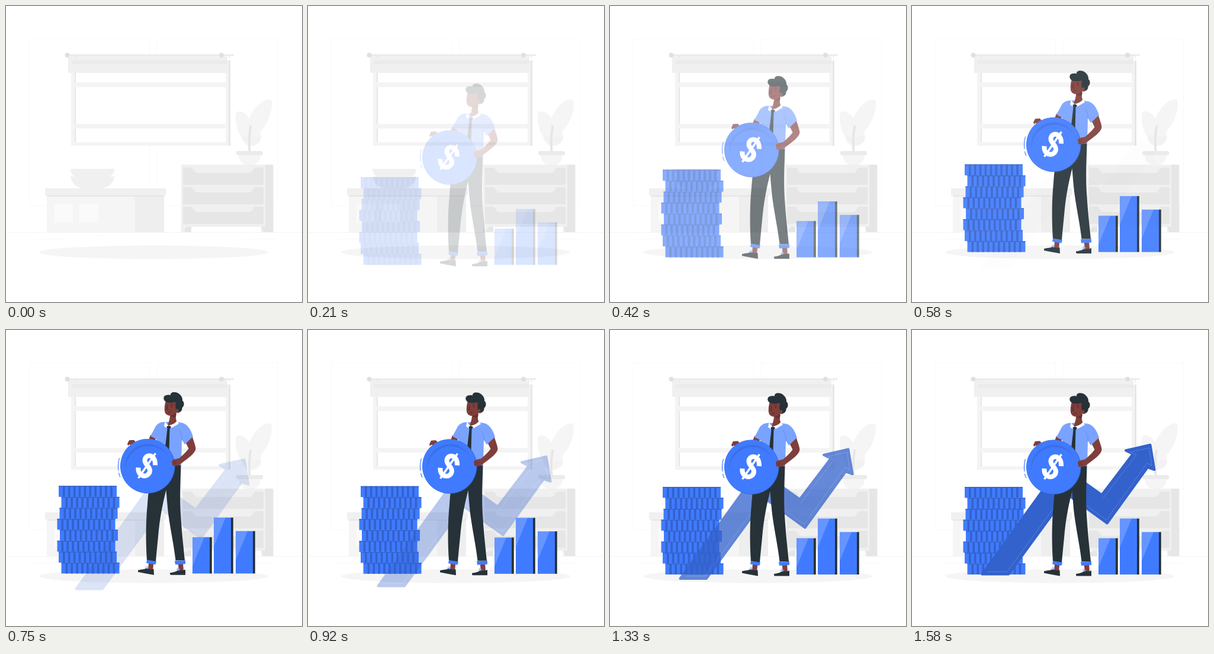
Write an HTML page that moves like this. It is 500 px wide and 500 px high and loops after 1620 ms.

```html
<!DOCTYPE html>
<html lang="en">
<head>
<meta charset="utf-8">
<title>Growth</title>
<style>
  html, body { margin: 0; width: 100%; height: 100%; overflow: hidden; background: #fff; }
  svg { display: block; width: 100vw; height: 100vh; }
  .rise, #arrow { opacity: 0; }
  .skin { fill: #7f3e3b; }
  .dark { fill: #263238; }
  .blue { fill: #407bff; }
  .shirt { fill: #79a3ff; }
  .g1 { fill: #fafafa; }
  .g2 { fill: #f5f5f5; }
  .g3 { fill: #f0f0f0; }
  .g4 { fill: #e6e6e6; }
  .g5 { fill: #e0e0e0; }
</style>
</head>
<body>
<svg viewBox="0 0 500 500" xmlns="http://www.w3.org/2000/svg">
  <defs>
    <g id="drawer"><path class="g4" d="M299 273H312Q315 273 317 277Q319 282 324 282H410Q415 282 417 277Q419 273 422 273H435V302H299Z"/></g>
  </defs>

  <g id="room">
    <g fill="none" stroke="#f9f9f9">
      <rect x="39" y="55" width="203.500" height="282.500" rx="2"/>
      <rect x="255" y="55" width="203.500" height="282.500" rx="2"/>
    </g>
    <path d="M0 382.500H500" stroke="#f2f2f2" stroke-width=".8"/>
    <path d="M47 394H97M153 388.500H167M403 394H456" stroke="#f5f5f5" stroke-width=".7"/>

    <!-- window and blind -->
    <path fill="#fff" d="M110 84H379V236H110Z"/>
    <path fill="#f4f4f4" fill-rule="evenodd" d="M110 92H379V236H110ZM118 98V129H371V98ZM118 137V199H371V137ZM118 207V230H371V207Z"/>
    <path class="g4" d="M376 92H379V236H376ZM116 98H118V129H116ZM116 137H118V199H116ZM116 207H118V230H116Z"/>
    <path class="g3" d="M105 84H374V113H105Z"/>
    <path fill="#ebebeb" d="M111 92H374V98H111Z"/>
    <path d="M103 82.700H385" stroke="#e0e0e0" stroke-width="1.500"/>
    <path d="M117 84V88M377.500 84V88" stroke="#e0e0e0"/>
    <circle class="g5" cx="103.500" cy="83" r="4"/>
    <circle class="g5" cx="364" cy="83" r="4"/>

    <!-- plant -->
    <g class="g2">
      <path d="M411 235C392 222 387 200 388 184C389 173 405 178 411 190C417 174 433 156 446 158C453 161 447 190 436 204C431 210 428 213 431 221C429 231 420 236 411 235Z"/>
      <path class="g3" opacity=".6" d="M411 237C402 234 396 226 399 218C406 223 420 222 430 219C433 228 425 237 411 237Z"/>
      <path d="M393 251H430C430 262 423 268 417 268H406C400 268 393 262 393 251Z"/>
    </g>
    <path d="M411.500 246C410 228 411 214 413.500 202" fill="none" stroke="#e6e6e6" stroke-width="4"/>
    <rect x="389" y="245" width="45" height="7" rx="2.500" fill="#ebebeb"/>

    <!-- dresser -->
    <path class="g3" d="M296 268H438V382H431V373H302V382H296Z"/>
    <path class="g4" d="M438 268H451.500V382H438ZM302 382V376Q303 373 306 373H313V382ZM431 373H438V382H435Z"/>
    <use href="#drawer"/><use href="#drawer" y="33"/><use href="#drawer" y="66"/>

    <!-- sideboard and bowls -->
    <path class="g2" d="M69 320H218V382H69Z"/>
    <path fill="#eee" d="M218 320H267V382H218Z"/>
    <path class="g1" d="M82 334H113V366H82ZM124 334H156V366H124Z"/>
    <path class="g3" d="M66 308H270V320H66Z"/>
    <path d="M69 321H267" stroke="#e2e2e2" stroke-width="1.500"/>
    <path class="g3" d="M109 275H183C183 281 180 286 175 288H183C182 299 172 308 160 308H132C120 308 110 299 109 288H117C112 286 109 281 109 275Z"/>

    <ellipse class="g2" cx="249.500" cy="416" rx="193.500" ry="11.500"/>
  </g>

  <g id="stack" class="rise"></g>

  <g id="arrow">
    <path d="M118.500 412.500L251 229L320.500 278.500L373 209.500L361 203.500L402.500 194L409.500 236L398 232L329.500 326.500L262 277.500L163 412.500Z" fill="#3362cc" stroke="#3362cc" stroke-width="4" stroke-linejoin="round"/>
    <path d="M127 408.500H160.500L261 271L328 321L397 225L405 229L400.500 199L368 206.500L379 211L322 285" fill="none" stroke="#fff" stroke-width=".6" opacity=".3"/>
  </g>

  <g id="bars" class="rise"></g>

  <g id="man" class="rise">
    <!-- feet -->
    <path class="skin" d="M241 394H249.500L248 408H240ZM290.500 394H299L300 409H292Z"/>
    <path class="dark" d="M223 407.500C229 406 235 406 239 403.500C242 407 246 406 249.500 405.500L250 415.500C240 414 231 412 223 410.500ZM277 412C283 411 288 410 292 406.500C295 409 299 407.500 303 406.500V415.500H278Q276.500 414 277 412Z"/>
    <path d="M235 403L240 405M237 401L241 403.500M288 406L293 408M289 404L294 406" stroke="#79a3ff" stroke-width="1.200"/>

    <!-- trousers -->
    <path class="dark" d="M249 229H295.500C295 255 293 285 295.500 320C297 345 300 370 302 391H286.500C284 368 278 340 275 318C273 304 272 290 270.500 272C266 290 261 312 258 340C256 362 254 380 253 394L238 391C236 360 236 325 239 296C240 280 243 252 249 229Z"/>
    <path class="blue" d="M238 390L254 392.500L252.500 398L237 395.500ZM285 391.500L303 391V397L286 398Z"/>

    <!-- body -->
    <path class="skin" d="M244 179L254 183L249 196H238Z"/>
    <path class="shirt" d="M268 157C259 157 254 161 251 168L244 181L254 186L253 230H296L297 187L302 195L316 182C313 172 307 160 297 158.500L288 157Z"/>
    <path d="M297 188C298 181 296 175 292 170" fill="none" stroke="#5b87e8" stroke-width=".8"/>
    <path class="skin" d="M277 141L288 143C286 150 287 155 290 158C286 163 279 165 273 165C272 161 278 155 277 141Z"/>
    <path fill="#fff" d="M269 155L267 164L271 167L275 164L280 167L292 160L289 155C285 160 280 162 275 163C271 161 270 158 269 155Z"/>
    <path class="dark" d="M271.500 164.500L275 163L279 165L276.500 169L275 225H266L272.500 169Z"/>

    <!-- head -->
    <path class="skin" d="M270 121C267.500 129 267 138 269 142C272 148 283 148 288 141.500C293 143.500 296 139 293 134L290 122Z"/>
    <path d="M278 146.500C282 146 285 144 288 141L287 148C284 150 281 149 278 146.500Z" fill="#000" opacity=".2"/>
    <path class="dark" d="M271 123.500C264 120 265 111 273 111.500C275 111 277 111 278 112C277 105 289 105 294 111C297 113.500 298.500 118 298 121C302 124 301 131 297.500 133C298 138 294 142 291 139.500C292.500 135 289 133 287.500 136.500C285.500 132 286.500 126 287 123C281 125 275 125 271 123.500Z"/>
    <path d="M271 128.500L273.500 128M278 127L282 128.500M273 131L271 136H274M273 141Q276 141.500 278 140" fill="none" stroke="#4a2220" stroke-width=".9"/>
    <path class="dark" d="M271.500 130.500h1.500v2h-1.500zM279 130h1.500v2h-1.500z"/>

    <!-- coin -->
    <path class="skin" d="M205 194L208 188L216 187.500L219 191L214 198L209 195L206 197Z"/>
    <circle cx="239.500" cy="231.700" r="46" fill="#3362cc"/>
    <circle class="blue" cx="238.700" cy="231.300" r="45.700"/>
    <path d="M202 238A38 38 0 0 1 274 216A39 39 0 0 0 202 238Z" fill="#3970e8"/>
    <path d="M191.500 218Q188.500 228 190 239M190.500 243Q191 247 193 250" fill="none" stroke="#407bff" stroke-width="1.200"/>
    <g fill="none" stroke="#fff">
      <path d="M252 230C253 211 236 210 234.500 221C233.500 229 244 232 243 240C241 252 222 251 223.500 234" stroke-width="8"/>
      <path d="M223.500 252L252.500 210" stroke-width="3.500"/>
    </g>

    <!-- right arm -->
    <path class="skin" d="M304 193L315 182.500C317 190 320 196 320.500 202C320 210 308 218 296 227C293 231 286 232 281 230.500L280 223C284 219 289 220 293 218C300 212 306 206 308.500 202Z"/>
    <path d="M281 225L288 224M282 228L288 227" stroke="#5f2c2a" stroke-width=".7"/>
  </g>
</svg>
<script>
  const $ = id => document.getElementById(id);
  const box = (x, y, w, h, fill) =>
    `<rect x="${x}" y="${y}" width="${w}" height="${h}" fill="${fill}"/>`;
  const BLUE = '#407bff', SHADE = '#3362cc', DARK = '#263238';

  // stacked coins with ribbed rims
  const lefts = [89, 93.5, 90.5, 86.5, 91, 86.5, 89, 93.5];
  $('stack').innerHTML = lefts.map((x, i) => {
    const y = 265 + i * 18.5;
    let s = box(x, y, 98, 18.5, BLUE) + box(x, y, 98, 1.5, SHADE);
    for (let k = 0; k < 10; k++) s += box(x + 7 + k * 8.9, y, 3.6, 18.5, SHADE);
    return s;
  }).join('');

  // bar chart
  const bars = [[315, 351.7], [351, 318.5], [388, 341.3]];
  $('bars').innerHTML = bars.map(([x, y]) =>
    box(x, y, 29, 413 - y, BLUE) + box(x + 29, y, 3.8, 413 - y, DARK) +
    `<path d="M${x} ${y}h20l-20 49z" fill="#fff" opacity=".2"/>`).join('');

  const LOOP = 1620, FPS = 24, LEAD = 0.02;
  const clamp = v => Math.min(1, Math.max(0, v));
  const curve = (a, b, s) => 3 * a * s * (1 - s) ** 2 + 3 * b * s * s * (1 - s) + s ** 3;

  // cubic-bezier(.36, -.01, .5, 1.38)
  function overshoot(x) {
    if (x <= 0 || x >= 1) return clamp(x);
    let lo = 0, hi = 1;
    for (let i = 0; i < 30; i++) {
      const mid = (lo + hi) / 2;
      if (curve(0.36, 0.5, mid) < x) lo = mid; else hi = mid;
    }
    return curve(-0.01, 1.38, lo);
  }

  function slideUp(el, p) {
    el.style.opacity = clamp(p);
    el.setAttribute('transform', `translate(0 ${30 * (1 - p)})`);
  }

  const risers = document.querySelectorAll('.rise');
  const start = performance.now();

  // the picture advances in steps of 1/24 s
  function draw() {
    const t = (performance.now() - start) % LOOP;
    const step = Math.min(38, Math.floor((t + 5) * FPS / 1000));
    const sec = step / FPS + LEAD;
    const p = overshoot(sec);
    risers.forEach(el => slideUp(el, p));
    slideUp($('arrow'), clamp(sec - 0.6));
    requestAnimationFrame(draw);
  }
  draw();
</script>
</body>
</html>
```
